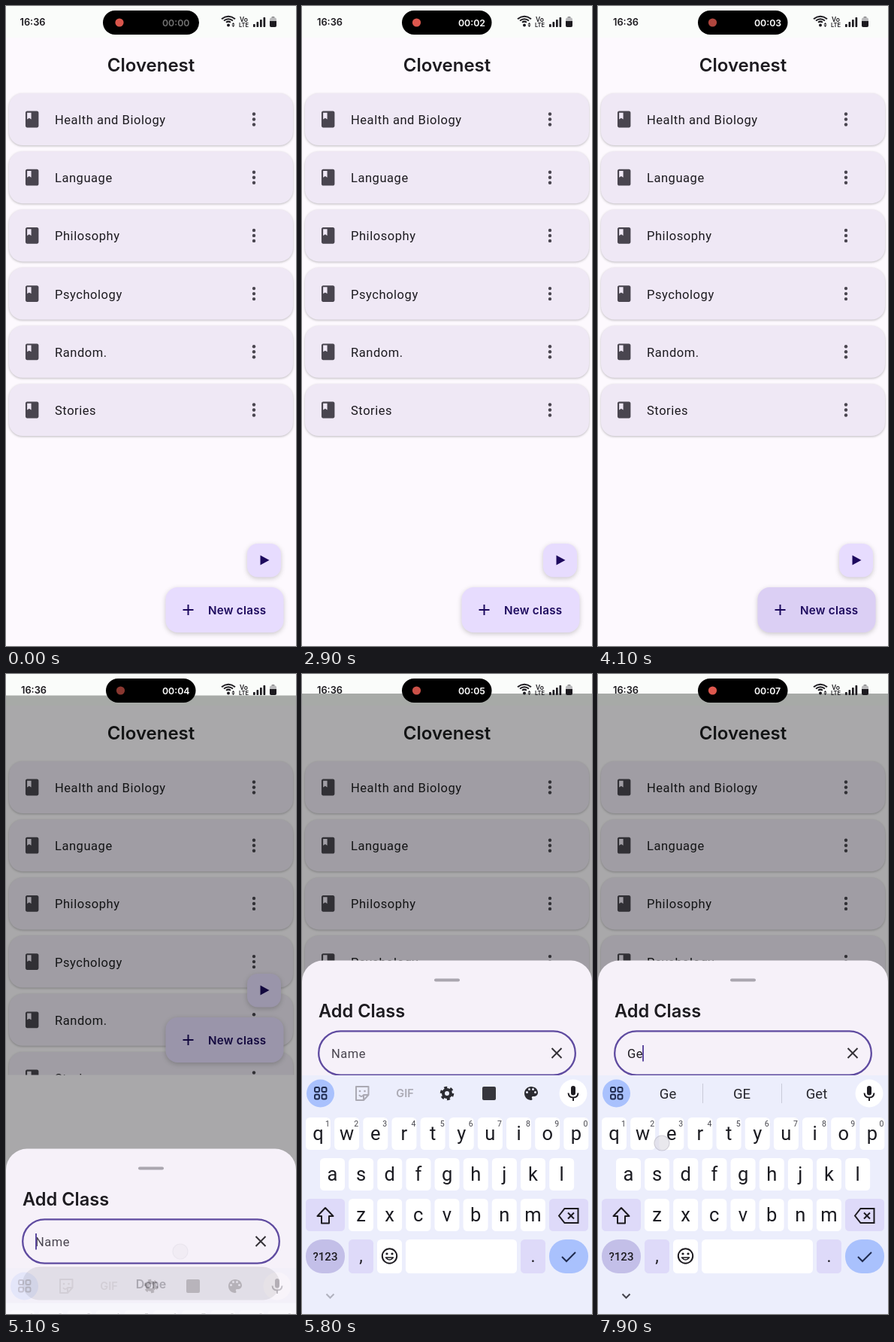
These frames come from a looping animation (386 px wide and 850 px high, 8000 ms). An HTML page:

```html
<!DOCTYPE html>
<html lang="en">
<head>
<meta charset="utf-8">
<title>Add a class</title>
<style>
html, body { margin: 0; height: 100%; overflow: hidden; background: #fdf9fe; }
svg { display: block; width: 100vw; height: 100vh; }
text { font-family: Roboto, sans-serif; white-space: pre; }
.bold { font-family: Inter, sans-serif; font-weight: 600; }
.body { font-size: 16.5px; letter-spacing: .55px; }
.mid { text-anchor: middle; }
.line { fill: none; stroke-width: 2; }
.card { filter: drop-shadow(0 1px 1.5px rgba(0, 0, 0, .25)); }
.fab { filter: drop-shadow(0 2px 3px rgba(0, 0, 0, .2)); }
</style>
</head>
<body>
<svg id="stage" viewBox="0 0 386 850"></svg>
<script>
const LOOP = 8000, INK = '#1d1b20', GREY = '#49454f', DEEP = '#1d0a5e';
const stage = document.getElementById('stage');

const rect = (x, y, w, h, r, fill, more = '') =>
  `<rect x="${x}" y="${y}" width="${w}" height="${h}" rx="${r}" fill="${fill}" ${more}/>`;
const circle = (x, y, r, fill, more = '') =>
  `<circle cx="${x}" cy="${y}" r="${r}" fill="${fill}" ${more}/>`;
const text = (x, y, str, size, cls = '', fill = INK, more = '') =>
  `<text x="${x}" y="${y}" font-size="${size}" class="${cls}" fill="${fill}" ${more}>${str}</text>`;
const line = (d, color, more = '') => `<path d="${d}" class="line" stroke="${color}" ${more}/>`;
const shape = (d, fill, more = '') => `<path d="${d}" fill="${fill}" ${more}/>`;
const each = (items, fn) => [...items].map(fn).join('');

const bookmark = 'M18 2H6C4.9 2 4 2.9 4 4V20C4 21.1 4.9 22 6 22H18C19.1 22 20 21.1 20 20V4C20 2.9 19.1 2 18 2ZM6 4H11V12L8.5 10.5L6 12Z';

function card(name, i) {
  return `<g transform="translate(0 ${(116 + i * 77.2).toFixed(1)})">
    ${rect(4, 0, 378, 69, 18, '#efe8f5', 'class="card"')}
    ${shape(bookmark, GREY, 'transform="translate(21.6 21.4) scale(1.09)"')}
    ${text(65, 41, name, 16.5, 'body')}
    ${each([27.5, 34.5, 41.5], y => circle(330, y, 2.2, GREY))}</g>`;
}

const home = `
  ${rect(0, 0, 386, 42, 0, '#fafcfa')}
  ${text(193, 87, 'Clovenest', 24, 'bold mid')}
  <clipPath id="area"><rect id="areaBox" y="42" width="386" height="808"/></clipPath>
  <g clip-path="url(#area)">
    ${each(['Health and Biology', 'Language', 'Philosophy', 'Psychology', 'Random.', 'Stories'], card)}
  </g>
  <g id="fabs">
    ${rect(321, 714, 45, 44.5, 14, '#e7dcfe', 'class="fab"')}
    ${shape('M338.5 729.5L350.5 736L338.5 742.5Z', DEEP)}
    ${rect(212.5, 772, 157, 60, 16, '#e7dcfe', 'class="fab"')}
    ${rect(212.5, 772, 157, 60, 16, '#b3a4d6', 'id="ripple"')}
    ${line('M235.5 802H249.5M242.5 795V809', DEEP)}
    ${text(269, 808, 'New class', 15.2, 'bold', DEEP, 'letter-spacing=".25"')}
  </g>`;

const status = `
  ${text(20, 25.5, '16:36', 12.8, 'bold', INK, 'id="clock"')}
  ${each([[9, 13.5], [6, 17], [3, 20.5]], ([w, y]) =>
    line(`M${296 - w} ${y + w * .42}Q296 ${y - w * .35} ${296 + w} ${y + w * .42}`, INK))}
  ${circle(296, 25.5, 2, INK)}
  ${shape('M300.5 24.5L302.5 22L304.5 24.5ZM300.5 25.5L302.5 28L304.5 25.5Z', INK)}
  ${text(316.5, 20.5, 'Vo', 8.5, 'bold mid')}
  ${text(316.5, 27.5, 'LTE', 7.5, 'bold mid')}
  ${each([0, 1, 2, 3], i => rect(329 + i * 4.5, 24 - i * 3, 2.7, 4 + i * 3, .8, INK))}
  ${rect(353.5, 14, 4, 3, 1, '#8a8a8c')}
  ${rect(351, 15.5, 9, 12.5, 2.2, '#b9b9bb')}
  ${shape('M351 20H360V26Q360 28 358 28H353Q351 28 351 26Z', INK)}
  ${rect(133, 6, 119.5, 32, 16, '#000', 'id="pill"')}
  ${circle(152.5, 22, 5.6, '#dd584e', 'id="dot"')}
  ${text(208, 26.5, '', 12.3, 'bold', '#fff', 'id="timer"')}`;

const sheet = `<g id="sheet">
  ${rect(0, 0, 386, 500, 28, '#f6f1f9')}
  ${rect(176, 24, 34, 4, 2, '#aaa6af')}
  ${text(22, 75.5, 'Add Class', 23.6, 'bold')}
  ${rect(22.2, 93.8, 341.6, 58.4, 29.2, 'none', 'stroke="#5f4ba0" stroke-width="2.3"')}
  ${text(39, 129.5, '', 16.5, 'body', GREY, 'id="field"')}
  ${rect(39, 112.5, 2, 21.5, 0, '#5f4ba0', 'id="caret"')}
  ${line('M332.5 116.5L345.5 129.5M345.5 116.5L332.5 129.5', '#333036')}
  ${rect(22, 157, 342, 44, 22, '#dfdae1')}
  ${text(193, 185, 'Done', 16, 'bold mid', '#99959d')}
  ${rect(0, 205, 386, 300, 0, '#fbf9fd')}</g>`;

// Keyboard
const PITCH = 38.15, TINT = '#dedaf9';
const letter = (x, y, ch) => rect(x, y, 33, 43, 5.5, '#fff')
  + text(x + 16.5, y + 29.5, ch, 25.5, 'mid letter', '#1b1b21');
const row = (keys, x, y) => each(keys, (ch, i) => letter(x + i * PITCH, y, ch));

const tools = `<g id="tools">
  ${line('M72 548H88.5V559L82 566H72ZM88.5 559H82V566M76 559Q79 563 82 559', '#aaa9b3', 'stroke-linejoin="round"')}
  ${circle(77, 554, 1.3, '#aaa9b3')}${circle(83.5, 554, 1.3, '#aaa9b3')}
  ${text(137, 562, 'GIF', 14.5, 'bold mid', '#aaa9b3')}
  ${circle(193, 557, 5, 'none', 'stroke="#2c2c32" stroke-width="4"')}
  ${circle(193, 557, 7.6, 'none', 'stroke="#2c2c32" stroke-width="3.4" stroke-dasharray="3.98"')}
  ${rect(240, 548, 18, 18, 2, '#36363c')}
  <g transform="translate(293 545)">
    ${shape('M12 3C7 3 3 7 3 12S7 21 12 21C13.5 21 13.9 19.5 13.1 18.5S13 16 14.2 16H16C18.8 16 21 13.8 21 11C21 6.6 17 3 12 3Z', '#2c2c32')}
    ${each([[6.5, 10.5], [9.5, 6.5], [14.5, 6.5], [17.5, 10.5]], ([x, y]) => circle(x, y, 1.5, '#eceefc'))}
  </g></g>`;

const keyboard = `<g id="keyboard">
  ${rect(0, 533, 386, 600, 0, '#eceefc')}
  ${circle(24.5, 557, 18.5, '#a9c1fd')}
  ${each([0, 1, 2, 3], i => rect(17 + i % 2 * 9.5, 549 + (i >> 1) * 9.5, 6, 6, 1.8, 'none', 'stroke="#1f2a4d" stroke-width="1.9"'))}
  ${tools}
  <g id="hints">
    ${each([93, 191.5, 291], x => text(x, 563.5, '', 18.5, 'mid hint', '#26262c'))}
    ${line('M139.5 544V570M244.5 544V570', '#c9cad8', 'style="stroke-width:1"')}
  </g>
  ${circle(361, 557, 18.5, '#fff')}
  ${rect(358, 547, 6, 12.5, 3, INK)}
  ${line('M354.5 556.5Q355 562.5 361 562.5T367.5 556.5M361 562.5V567', INK)}
  ${row('qwertyuiop', 5, 589)}
  ${each('1234567890', (n, i) => text(34 + i * PITCH, 601, n, 10.5, 'mid', '#45454d'))}
  ${row('asdfghjkl', 24, 643)}
  ${rect(5, 697, 52, 43, 5.5, TINT)}
  ${line('M31 709L41.5 720H36V729.5H26V720H20.5Z', INK, 'id="shift" stroke-linejoin="round"')}
  ${row('zxcvbnm', 62, 697)}
  ${rect(329, 697, 52, 43, 5.5, TINT)}
  ${line('M342 719.5L349.5 710H367.5V729H349.5ZM354 715.5L362 723.5M362 715.5L354 723.5', INK)}
  ${rect(5, 751, 52, 45, 22, '#c3bfe8')}
  ${text(31, 778.5, '?123', 15, 'mid', INK, 'font-weight="500"')}
  ${rect(62, 751, 33, 45, 5.5, TINT)}${text(78.5, 781, ',', 23, 'mid')}
  ${rect(100, 751, 33, 45, 5.5, '#fff')}
  ${circle(116.5, 773, 9.7, 'none', 'stroke="#1d1b20" stroke-width="2"')}
  ${circle(113, 770, 1.6, INK)}${circle(120, 770, 1.6, INK)}
  ${line('M111.5 775Q116.5 781 121.5 775Z', INK, 'stroke-linejoin="round" style="stroke-width:1.6"')}
  ${rect(138, 751, 148, 45, 5.5, '#fff')}
  ${rect(291, 751, 33, 45, 5.5, TINT)}${text(307.5, 781, '.', 23, 'mid')}
  ${rect(329, 751, 52, 45, 22, '#a9c1fd')}
  ${line('M346 774L352 780L364 768', '#1f2a4d')}
  ${line('M32.5 823.5L37.5 828.5L42.5 823.5', '#44444c', 'id="chevron"')}
</g>`;

stage.innerHTML = home + rect(0, 28.5, 386, 824, 0, '#000802', 'id="scrim"') + sheet + keyboard + status
  + circle(0, 0, 10, '#dcdae2', 'id="touch" stroke="#b3b0bd" stroke-width="1.2"');

const el = {};
stage.querySelectorAll('[id]').forEach(n => el[n.id] = n);
const letters = [...stage.querySelectorAll('.letter')].map(n => [n, n.textContent]);
const hints = [...stage.querySelectorAll('.hint')];

const set = (node, attrs) => { for (const k in attrs) node.setAttribute(k, attrs[k]); };
const ramp = (t, from, to) => Math.min(1, Math.max(0, (t - from) / (to - from)));
const ease = (t, from, to) => 1 - (1 - ramp(t, from, to)) ** 3;
const shift = (node, y) => set(node, { transform: `translate(0 ${y})` });

// Start time and place of each tap
const taps = [[3650, 287, 811], [4780, 232, 767], [7000, 31, 720], [7380, 192, 667], [7720, 85, 623]];

function draw(t) {
  // Status bar
  const p = ease(t, 100, 700);
  set(el.pill, { x: 129 + 4 * p, width: 128 - 8.5 * p });
  set(el.clock, { x: 18.5 + 1.5 * p });
  const glow = .5 - .5 * Math.cos(2 * Math.PI * (t / 1600 - .33));
  set(el.dot, { cx: 151 + 1.5 * p, opacity: .5 + .5 * Math.min(1, glow * 1.3) });
  set(el.timer, { opacity: .45 + .55 * p });
  el.timer.textContent = '00:0' + Math.max(0, Math.floor((t - 400) / 1000));

  // Page
  set(el.ripple, { opacity: .6 * ramp(t, 3660, 3780) * (1 - ramp(t, 3950, 4200)) });
  const resized = t >= 5050;
  set(el.areaBox, { height: resized ? 490.5 : 808 });
  shift(el.fabs, resized ? -316 : 0);

  // Sheet and keyboard
  const rise = ease(t, 5150, 5400);
  set(el.scrim, { y: 28.5 - 2.5 * rise, opacity: .335 * ramp(t, 4150, 4400) });
  shift(el.sheet, 850 - 219.5 * ease(t, 4200, 4500) - 250 * rise);
  shift(el.keyboard, 256 * (1 - rise));
  set(el.keyboard, { opacity: ramp(t, 5050, 5280) });
  set(el.chevron, { opacity: .35 + .65 * ramp(t, 5800, 6100) });

  // Typing
  const typed = t < 7450 ? '' : t < 7800 ? 'G' : 'Ge';
  const caps = t >= 7050 && t < 7450;
  letters.forEach(([n, ch]) => n.textContent = caps ? ch.toUpperCase() : ch);
  set(el.shift, { style: caps ? 'fill:' + INK : '' });
  el.field.textContent = typed || 'Name';
  el.field.setAttribute('fill', typed ? INK : GREY);
  const blink = t >= 4900 && (t - 4900) % 1000 < 500;
  set(el.caret, { x: 39 + [0, 11, 20][typed.length], opacity: typed || blink ? 1 : 0 });
  set(el.tools, { opacity: typed ? 0 : 1 });
  set(el.hints, { opacity: typed ? 1 : 0 });
  const words = typed === 'G' ? ['G', 'Go', 'Get'] : ['Ge', 'GE', 'Get'];
  hints.forEach((n, i) => n.textContent = words[i]);

  const tap = taps.find(([start]) => t >= start && t < start + 380);
  set(el.touch, tap
    ? { cx: tap[1], cy: tap[2], opacity: .7 * (1 - ramp(t, tap[0] + 150, tap[0] + 380)) }
    : { opacity: 0 });
}

function tick() {
  draw(performance.now() % LOOP);
  requestAnimationFrame(tick);
}
tick();
</script>
</body>
</html>
```
